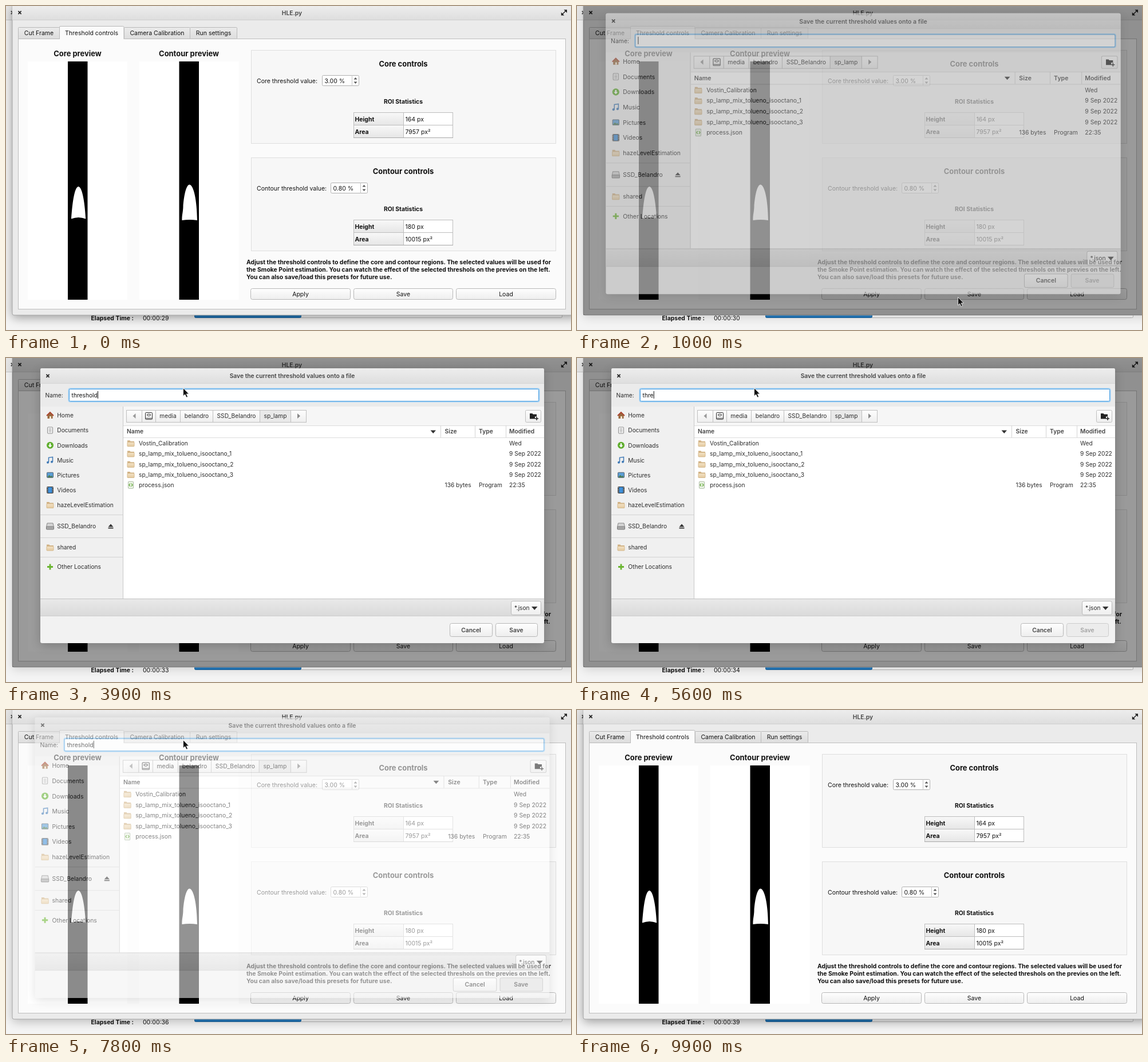
An HTML page that plays this animation: 987 px wide and 567 px high, repeating every 10000 ms.

```html
<!DOCTYPE html>
<html lang="en">
<head>
<meta charset="utf-8">
<title>Threshold presets</title>
<style>
html, body { margin: 0; width: 100%; height: 100%; overflow: hidden; background: #f4f4f4; }
svg { display: block; width: 100%; height: 100%; }
text { font: 10.2px Inter, "Open Sans", sans-serif; fill: #111; white-space: pre; }
.q { font-size: 10.5px; }
.b { font-weight: 700; font-size: 10.45px; }
.s { font-weight: 600; font-size: 10.3px; fill: #444; }
.h { font-weight: 700; font-size: 12.95px; }
.m { text-anchor: middle; }
.d { fill: #2c2c2c; }
</style>
</head>
<body>
<svg id="stage" viewBox="0 0 987 567"></svg>
<script>
const LOOP = 10000;
const stage = document.getElementById('stage');

// drawing helpers
const rect = (x, y, w, h, fill, more = '') =>
  `<rect x="${x}" y="${y}" width="${w}" height="${h}" fill="${fill}" ${more}/>`;
const box = (x, y, w, h, fill, line, r = 0, more = '') =>
  rect(x + .5, y + .5, w - 1, h - 1, fill, `stroke="${line}" rx="${r}" ${more}`);
const path = (d, fill = 'none', more = '') => `<path d="${d}" fill="${fill}" ${more}/>`;
const line = (x1, y1, x2, y2, color) => path(`M${x1} ${y1}L${x2} ${y2}`, 'none', `stroke="${color}"`);
const text = (x, y, s, cls = '', more = '') => `<text x="${x}" y="${y}" class="${cls}" ${more}>${s}</text>`;
const at = (x, y, s) => `<g transform="translate(${x} ${y})">${s}</g>`;
const cross = (x, y) => path(`M${x - 2.6} ${y - 2.6}l5.2 5.2m0 -5.2l-5.2 5.2`, 'none', 'stroke="#222" stroke-width="1.7"');
const grad = (id, a, b) =>
  `<linearGradient id="${id}" x2="0" y2="1"><stop stop-color="${a}"/><stop offset="1" stop-color="${b}"/></linearGradient>`;

const defs = `<defs>
  ${grad('bar', '#ededed', '#dedede')}${grad('tab', '#ebebeb', '#dddddd')}
  ${grad('btn', '#fefefe', '#eeeeee')}${grad('cell', '#f8f8f8', '#e6e6e6')}
  ${grad('foot', '#e9e9e9', '#dadada')}${grad('tan', '#f4e3c6', '#e3c99f')}
  ${grad('blue', '#3d9be0', '#1f74b8')}
  <filter id="soft" x="-20%" y="-20%" width="140%" height="140%"><feGaussianBlur stdDeviation="9"/></filter>
</defs>`;

const backWindow = () => rect(0, 0, 987, 567, '#f4f4f4') + rect(0, 0, 987, 24, '#e6e6e6') +
  line(0, 24.5, 987, 24.5, '#c6c6c6') + cross(11.5, 11.5) +
  text(148.5, 549.7, 'Elapsed Time :', 'b') + text(239, 549.7, '', 'q', 'id="clock"') +
  box(329, 528, 643, 18, '#f8f8f8', '#b9b9b9', 2) + box(329, 528, 187, 18, 'url(#blue)', '#1c659f', 2);

const tab = (x, w, s) => box(x, 37, w, 21, 'url(#tab)', '#b9b9b9', 1) + text(x + w / 2, 51.3, s, 'm q');

const preview = (x, title, flame) => text(x + 87, 87.6, title, 'h m') +
  rect(x, 97, 174, 417, '#fff') + rect(x + 70, 97, 34.5, 417, '#000') + path(flame, '#fff');

const button = (x, w, s) => box(x, 494, w, 20, 'url(#btn)', '#b8b8b8', 3) + text(x + w / 2, 508, s, 'm q');

function controls(y, name, spinX, value, height, area) {
  const cell = (cy, k, v) => box(607, cy, 88, 23, 'url(#cell)', '#bdbdbd') +
    box(694, cy, 87, 23, '#fff', '#bdbdbd') + text(609.5, cy + 15.6, k, 'b') + text(697.5, cy + 15.6, v, 'q');
  return at(0, y, box(428, 77, 533, 164, '#f7f7f7', '#dedede') +
    text(694, 105.7, name + ' controls', 'h m') +
    text(438, 134.6, name + ' threshold value:', 'q') +
    box(spinX, 121, 65, 19, '#fff', '#b0b0b0', 2) + line(spinX + 52.5, 121, spinX + 52.5, 140, '#c4c4c4') +
    path(`M${spinX + 55.5} 128.5l3 -3.6 3 3.6zm0 4l3 3.6 3 -3.6z`, '#555') +
    text(spinX + 4.5, 134.6, value, 'q') +
    text(694, 171, 'ROI Statistics', 'b m') +
    cell(186, 'Height', height) + cell(208, 'Area', area) + line(607, 230.5, 781, 230.5, '#a8a8a8'));
}

const mainWindow = () => rect(11, -4, 990, 545, '#ebebeb', 'stroke="#a6a6a6" rx="3"') +
  rect(11, 0, 976, 24, 'url(#bar)') + line(11, 24.5, 987, 24.5, '#cfcfcf') +
  cross(24, 11.5) + text(499.5, 15.6, 'HLE.py', 'b m s') +
  path('M974.5 6.5h5.500v5.500zM969.800 11v5.500h5.500z', '#222') +
  path('M972 14.300l5.800 -5.800', 'none', 'stroke="#222" stroke-width="1.4"') +
  box(21, 57, 957, 474, '#fbfbfb', '#bdbdbd') +
  tab(21, 73, 'Cut Frame') + tab(206, 116, 'Camera Calibration') + tab(321, 83, 'Run settings') +
  path('M93.5 58V37q0 -1.500 1.500 -1.500h109.500q1.500 0 1.500 1.500V58', '#fbfbfb', 'stroke="#b9b9b9"') +
  text(149.5, 50.8, 'Threshold controls', 'm q') +
  preview(38, 'Core preview', 'M114 372.5C115.5 350 119 316.5 126.5 316C134 316.500 138 350 139.200 372.5Q126.500 367.500 114 372.5z') +
  preview(232.5, 'Contour preview', 'M307.5 375C307 366 309.500 360 309.500 350C310 342 313 313.500 320.5 312.500C328 313.500 333.500 340 334 375Q320.500 373 307.5 375z') +
  controls(0, 'Core', 552, '3.00 %', '164 px', '7957 px²') +
  controls(188, 'Contour', 567, '0.80 %', '180 px', '10015 px²') +
  ['Adjust the threshold controls to define the core and contour regions. The selected values will be used for',
   'the Smoke Point estimation. You can watch the effect of the selected threshols on the previes on the left.',
   'You can also save/load this presets for future use.'].map((s, i) => text(420, 452.4 + 13 * i, s, 'b')).join('') +
  button(427, 175, 'Apply') + button(607, 174, 'Save') + button(786, 175, 'Load') +
  rect(608, 495, 172, 18, '#000', 'id="press" opacity="0" rx="3"') +
  rect(11, 0, 976, 541, '#000', 'id="dim" opacity="0"');

// icons are centred on 0,0
const icon = {
  home: path('M-4.500 -.5V5.500H4.500V-.5L0 -4.500z', '#9a6a3f') + path('M-1 5.500V1.500H2V5.500z', '#f3e3cf') +
    path('M-6 .5L0 -5.500L6 .5', 'none', 'stroke="#a8402a" stroke-width="1.800"'),
  doc: box(-5, -6, 10, 12, '#f6f6f6', '#8c8c8c', 1) + path('M-2.500 -2.500h5m-5 2.500h5m-5 2.500h5', 'none', 'stroke="#999"'),
  down: '<circle r="6" fill="#5fae2e"/>' + path('M-1.200 -3.500h2.400V0H3.500L0 3.700L-3.500 0H-1.200z', '#fff'),
  music: path('M-2.500 4V-4.500L4.500 -5.500V3', 'none', 'stroke="#3f79b5" stroke-width="1.500"') +
    '<circle cx="-4" cy="4" r="2" fill="#3f79b5"/><circle cx="3" cy="3" r="2" fill="#3f79b5"/>',
  picture: box(-6, -5, 12, 10, '#5d9fd6', '#55616b', 1) + path('M-5 4L-1.500 0L1 2.500L2.500 1L5 4z', '#4c7a4a'),
  video: box(-6, -6, 12, 12, '#333', '#333', 1) + rect(-3.5, -5, 7, 10, '#3f8fd8') +
    path('M-4.800 -5V5M4.800 -5V5', 'none', 'stroke="#ddd" stroke-width="1.200" stroke-dasharray="1.500 1.500"'),
  folder: path('M-6 -5H-1.500L-.5 -3.500H6V5.500H-6z', '#d0b184') + box(-6.5, -2.5, 13, 8.5, 'url(#tan)', '#d6ba8e', 1),
  drive: path('M-6.500 1L-5 -5.500H5L6.500 1z', '#d4d4d4', 'stroke="#888"') + box(-7, 0, 14, 6, '#a9a9a9', '#777', 1),
  plus: path('M-1.400 -5h2.800v3.600H5v2.800H1.400V5h-2.800V1.400H-5v-2.800h3.600z', '#69b52f'),
  json: box(-5, -6.5, 10, 13, '#eef6e8', '#a9b8a0', 1) + path('M-1 -2.500L-3 0L-1 2.500M1 -2.500L3 0L1 2.500', 'none', 'stroke="#57a02c" stroke-width="1.200"')
};

const places = [['home', 'Home', 100.5], ['doc', 'Documents', 126.5], ['down', 'Downloads', 152.8], ['music', 'Music', 178.8],
  ['picture', 'Pictures', 204.8], ['video', 'Videos', 231], ['folder', 'hazeLevelEstimation', 257],
  ['drive', 'SSD_Belandro', 294.5], ['folder', 'shared', 331.5], ['plus', 'Other Locations', 365.5]];
const runs = [1, 2, 3].map(i => 'sp_lamp_mix_tolueno_isooctano_' + i);
const folders = ['Vostin_Calibration', ...runs];

const crumb = (x, w, s, fill = 'url(#btn)') => box(x, 91, w + 1, 22, fill, '#bfbfbf') +
  text(x + w / 2 + .5, 105.3, s, 'm d');
const fileRow = (i, kind, cells) => {
  const y = 149.2 + 18.25 * i;
  return at(218, y, icon[kind]) + [232, 766.5, 826, 879].map((x, k) => text(x, y + 3.9, cells[k], 'd')).join('');
};

const dialog = () => rect(60, 22, 880, 481, '#000', 'opacity=".2" filter="url(#soft)"') +
  rect(60, 18, 880, 481, '#f2f2f2', 'rx="3"') +
  rect(60, 18, 880, 27, 'url(#bar)', 'rx="3"') + rect(60, 44, 880, 41, '#ebebeb') + line(60, 44.5, 940, 44.5, '#d6d6d6') +
  cross(73, 31.3) + text(500, 35.4, 'Save the current threshold values onto a file', 'm s b') +
  text(68.5, 68.8, 'Name:', 'd') +
  rect(109.5, 53.5, 822, 23, '#fff', 'rx="3" stroke="#9fd0f5" stroke-width="2"') +
  rect(110.5, 54.5, 820, 21, '#fff', 'rx="2" stroke="#4c9fe0"') +
  text(114.6, 68.8, '', '', 'id="entry"') + rect(0, 58, 1, 13, '#111', 'id="caret"') +
  rect(60, 85, 144, 336, '#f0f0f0') + rect(205, 85, 735, 33, '#f6f6f6') + rect(205, 118, 735, 303, '#fff') +
  line(204.5, 85, 204.5, 421, '#c9c9c9') +
  [274.5, 314.5, 348.5].map(y => line(60, y, 204, y, '#d4d4d4')).join('') +
  places.map(([k, s, y]) => at(77, y, icon[k]) + text(89.3, y + 3.9, s, 'd')).join('') +
  path('M178.500 295.500L183 290.500L187.500 295.500zM178.500 296.800h9v1.700h-9z', '#333') +
  crumb(210, 27, '') + crumb(237, 24, '') + crumb(261, 43, 'media') + crumb(304, 57, 'belandro') +
  crumb(361, 82, 'SSD_Belandro') + crumb(443, 54, 'sp_lamp', '#e9e9e9') + crumb(497, 27, '') +
  path('M226.500 97v9l-5 -4.500z', '#999') + path('M509 97v9l5 -4.500z', '#888') +
  box(243, 95, 13, 13, '#f2f2f2', '#333', 1) + path('M246 99.500q3.500 -3 7 0q-3.500 4 -7 0zM244 105.500h11', 'none', 'stroke="#333"') +
  box(907, 91, 28, 22, 'url(#btn)', '#bfbfbf', 2) +
  path('M915 97h4.500l1.200 1.500h6.300v4h-3v4h-9z', '#222') + path('M927 103v6m-3 -3h6', 'none', 'stroke="#222" stroke-width="1.500"') +
  line(205, 118.5, 940, 118.5, '#dcdcdc') + line(205, 139.5, 940, 139.5, '#dcdcdc') +
  [759.5, 819.5, 873.5].map(x => line(x, 118, x, 139, '#d4d4d4')).join('') +
  [[211, 'Name'], [766.5, 'Size'], [826, 'Type'], [879, 'Modified']].map(([x, s]) => text(x, 132.4, s, 's')).join('') +
  path('M741.500 126.500h9.500l-4.750 5.500z', '#333') +
  folders.map((s, i) => fileRow(i, 'folder', [s, '', '', i ? '9 Sep 2022' : 'Wed'])).join('') +
  fileRow(4, 'json', ['process.json', '136 bytes', 'Program', '22:35']) +
  rect(60, 421, 880, 31, 'url(#foot)') + line(60, 421.5, 940, 421.5, '#c2c2c2') + line(60, 451.5, 940, 451.5, '#cdcdcd') +
  box(882, 425, 53, 25, 'url(#btn)', '#b8b8b8', 3) + text(888, 441.4, '*.json', 'd') + path('M918 435h10.500l-5.250 6z', '#333') +
  box(775, 464, 75, 24, 'url(#btn)', '#b8b8b8', 3) + text(812.5, 479.6, 'Cancel', 'm s') +
  `<g id="save">${box(855, 464, 74, 24, 'url(#btn)', '#b8b8b8', 3)}${text(891.5, 479.6, 'Save', 'm s')}</g>` +
  `<g id="popup">${box(109, 77, 823, 93, '#fff', '#c4c4c4')}${
    [folders[0] + '/', 'process.json', ...runs.map(s => s + '/')].map((s, i) => text(114.6, 90 + 18.2 * i, s, 'd')).join('')}</g>`;

stage.innerHTML = defs + backWindow() +
  rect(11, 4, 990, 541, '#000', 'id="shade" filter="url(#soft)"') +
  mainWindow() + `<g id="dialog">${dialog()}</g>` +
  `<g id="cursor">${path('M0 0V14.200L3.200 11.300L5.600 16.500L8 15.400L5.700 10.400H10z', '#111', 'stroke="#fff" stroke-width=".8"')}</g>`;

const el = {};
stage.querySelectorAll('[id]').forEach(n => el[n.id] = n);
const [saveBox, saveText] = el.save.children;
const set = (n, key, v) => n.setAttribute(key, v);
const show = (n, on) => set(n, 'display', on ? 'inline' : 'none');
const clamp = v => Math.min(1, Math.max(0, v));
const easeOut = u => 1 - (1 - u) ** 2;

const firstKeys = [2200, 2400, 2600, 2800, 2900, 2900, 3000, 3200, 3300];
const secondKeys = [5300, 5400, 5500, 5600, 5800, 5900, 6000, 6100, 6200];
const route = [[100, 671, 541], [400, 666, 513], [500, 666, 513], [600, 665.5, 509.5], [1100, 665.5, 509.5],
  [1600, 309.5, 57], [1900, 309.5, 52.5], [9300, 309.5, 52.5], [9600, 75, 1], [LOOP, 75, 1]];

function pointer(t) {
  const i = Math.max(1, route.findIndex(p => p[0] > t));
  const [t0, x0, y0] = route[i - 1], [t1, x1, y1] = route[i];
  const u = clamp((t - t0) / (t1 - t0)), k = u * u * (3 - 2 * u);
  return `translate(${x0 + (x1 - x0) * k} ${y0 + (y1 - y0) * k})`;
}

function draw(t) {
  el.clock.textContent = '00:00:' + (29 + Math.floor((t + 100) / 1000));

  const seen = easeOut(clamp((t - 915) / 250)) * (1 - easeOut(clamp((t - 7740) / 250)));
  show(el.dialog, seen > 0);
  set(el.dialog, 'opacity', seen);
  set(el.dialog, 'transform', `translate(500 258.5) scale(${1 + .05 * (1 - seen)}) translate(-500 -258.5)`);

  const dim = clamp((t - 850) / 150) * (1 - clamp((t - 7700) / 100));
  set(el.dim, 'opacity', .39 * dim);
  set(el.shade, 'opacity', .38 - .24 * Math.max(dim, seen));
  set(el.press, 'opacity', t >= 700 && t < 900 ? .08 : 0);

  const typed = (t < 4500 ? firstKeys : secondKeys).filter(k => k <= t).length;
  el.entry.textContent = 'threshold'.slice(0, typed);
  set(el.caret, 'x', 114.8 + (typed && seen ? el.entry.getComputedTextLength() : 0));
  show(el.caret, t < 1800 || t >= 2200);
  show(el.popup, t >= 4600 && t < 5300);

  const ready = (t >= 2400 && t < 4500) || t >= 5800;
  set(saveBox, 'fill', !ready ? '#ececec' : t >= 7300 ? '#e2e2e2' : 'url(#btn)');
  set(saveBox, 'stroke', ready ? '#b8b8b8' : '#cccccc');
  saveText.style.fill = ready ? '#444' : '#a2a2a2';

  show(el.cursor, t >= 100 && t < 9700);
  set(el.cursor, 'transform', pointer(t));
}

const start = performance.now();
function tick() {
  const t = (performance.now() - start) % LOOP;
  draw(Math.floor(t / 100) * 100);
  requestAnimationFrame(tick);
}
tick();
</script>
</body>
</html>
```
